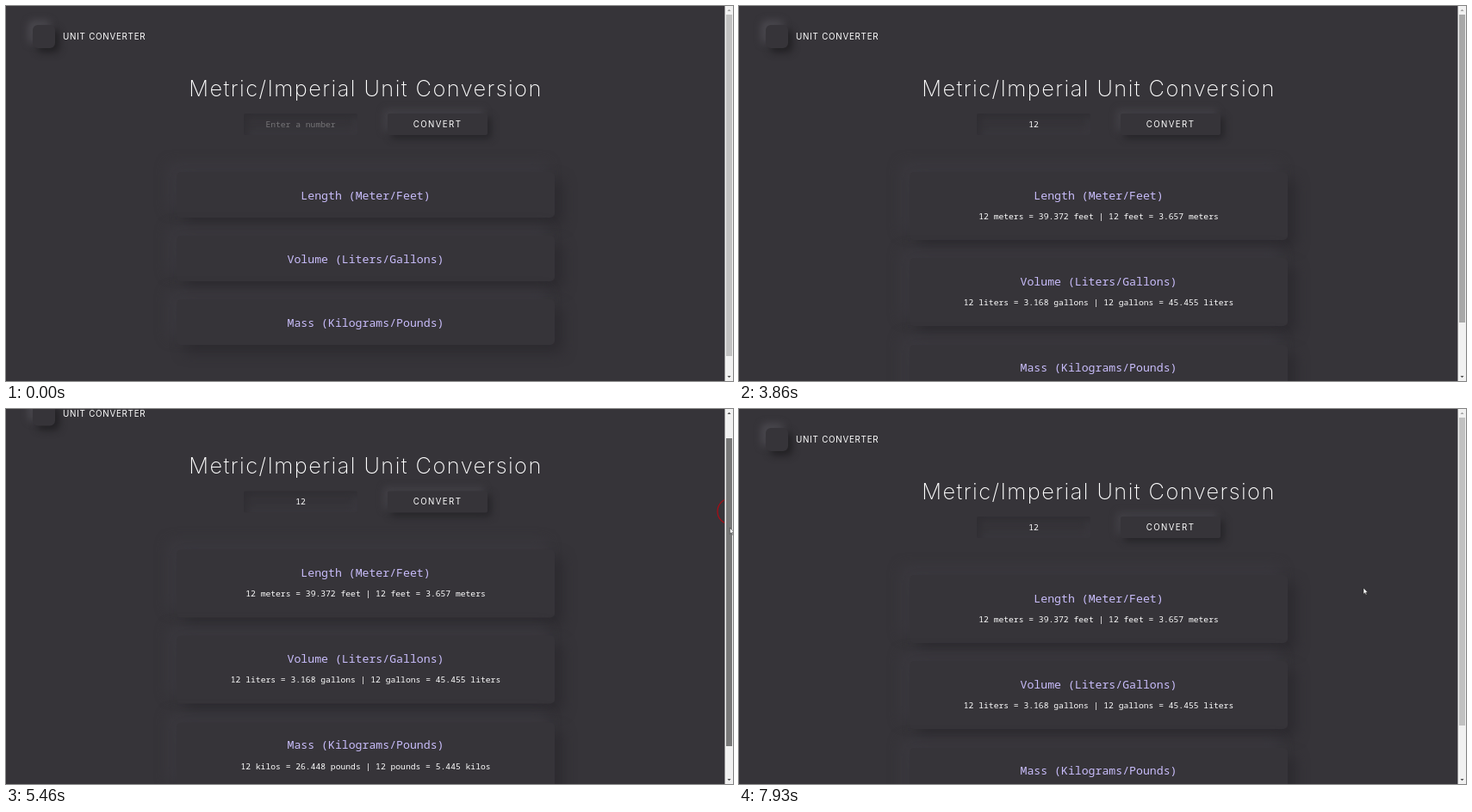
An HTML page that plays this animation: 844 by 436 pixels, repeating every 8 s.

```html
<!DOCTYPE html>
<html lang="en">
<head>
<meta charset="utf-8">
<title>Unit Converter</title>
<style>
html, body { margin: 0; width: 100%; height: 100%; overflow: hidden; background: #363439; }
body { position: relative; font-family: Inter, sans-serif; color: #fff; }
body *, .card { position: absolute; box-sizing: border-box; white-space: pre; }
#page { left: 0; top: 0; width: 835px; height: 508px; }
.logo { left: 30.5px; top: 22px; width: 26.5px; height: 26.5px; border-radius: 6px; background: #363439;
  box-shadow: 5px 5px 9px #222124, -5px -5px 9px #4c4a50; }
.brand { left: 66px; top: 25.5px; line-height: 20px; font-size: 9.8px; letter-spacing: .75px; }
h1 { margin: 0; left: 0; width: 100%; top: 75.5px; line-height: 40px; text-align: center;
  font-size: 25.4px; font-weight: 200; letter-spacing: 1.43px; }
#input, .card { font-family: "Noto Sans Mono", "DejaVu Sans Mono", monospace; text-align: center; }
#input { left: 276px; top: 125px; width: 132px; height: 25px; line-height: 25px; font-size: 9.68px; font-weight: 500;
  border-radius: 2px; box-shadow: inset 4px 4px 9px #302e33, inset -4px -4px 9px #3b393f; }
#input.hint { color: #757477; font-weight: 400; }
#input.focus { outline: 1px solid #e4e4e4; border-radius: 3px; }
#caret { top: 132px; width: 1px; height: 12px; background: #ccc; }
.button { left: 443px; top: 125px; width: 116px; height: 25px; line-height: 25px; border-radius: 2px; text-align: center;
  background: #363439; font-size: 9.7px; letter-spacing: 1.4px;
  box-shadow: 4px 4px 8px #262529, -4px -4px 8px #454349; }
.card { left: 198px; width: 439px; border-radius: 5px; background: #363439;
  box-shadow: 9px 9px 15px #2d2b30, -9px -9px 15px #3b393f; }
.card * { left: 0; width: 100%; line-height: 20px; }
.card b { top: 16.5px; font-size: 13.2px; font-weight: 500; color: #c9bdfb; }
.card i { top: 42px; font-size: 9.68px; font-weight: 500; font-style: normal; }
#bar { left: 834px; top: 0; width: 10px; height: 436px; background: #f1f1f1; border-left: 1px solid #949396; }
#thumb { left: 1px; width: 7px; }
svg { left: 0; top: 0; }
#ring { fill: none; stroke: #b00a14; stroke-width: 1.2; }
#arrow, #hand { fill: #fff; stroke: #111; stroke-width: .5; }
</style>
</head>
<body>
<div id="page">
  <div class="logo"></div>
  <div class="brand">UNIT CONVERTER</div>
  <h1>Metric/Imperial Unit Conversion</h1>
  <div id="input"></div>
  <div id="caret"></div>
  <div class="button">CONVERT</div>
</div>
<svg width="844" height="436"><circle id="ring" r="15"/></svg>
<div id="bar">
  <div id="thumb"></div>
  <svg width="9" height="436"><path id="up" d="M2.5 6L4.5 3.8L6.5 6Z"/><path id="down" d="M2.5 430L4.5 432.2L6.5 430Z"/></svg>
</div>
<svg width="844" height="436">
  <path id="arrow" d="M0 0V7.2L1.7 5.7L2.8 8.2L3.9 7.7L2.8 5.3H5Z"/>
  <path id="hand" d="M-1 .6Q0-.6 1 .6V4L4.2 4.8Q5 5 4.9 6L4.4 9L3.6 10.6H-.6L-3 6.8Q-3.2 5.4-2 5.8L-1 6.8Z"/>
</svg>
<script>
const $ = id => document.getElementById(id);
const show = (el, on) => el.style.visibility = on ? 'visible' : 'hidden';
const MAX_SCROLL = 71.5;

const cards = [
  ['Length (Meter/Feet)', '12 meters = 39.372 feet | 12 feet = 3.657 meters'],
  ['Volume (Liters/Gallons)', '12 liters = 3.168 gallons | 12 gallons = 45.455 liters'],
  ['Mass (Kilograms/Pounds)', '12 kilos = 26.448 pounds | 12 pounds = 5.445 kilos']
].map(([title, result]) => {
  const card = document.createElement('div');
  card.className = 'card';
  card.innerHTML = `<b>${title}</b><i>${result}</i>`;
  $('page').append(card);
  return card;
});

// Keys are [time, value, ...]; values glide between neighbours.
function track(keys, t) {
  const n = keys.findIndex(k => k[0] > t);
  if (n === 0) return keys[0].slice(1);
  if (n < 0) return keys[keys.length - 1].slice(1);
  const a = keys[n - 1], b = keys[n], p = (t - a[0]) / (b[0] - a[0]);
  return a.slice(1).map((v, i) => v + (b[i + 1] - v) * p);
}

const scrollKeys = [[4130, 0], [4200, 6], [4330, 38], [4460, 66], [4530, MAX_SCROLL],
  [5270, MAX_SCROLL], [5330, 62], [5460, 29.6], [5600, 7], [5730, 0]];
const mouseKeys = [[2000, 342, 138], [2130, 385, 139], [2330, 490, 141], [2460, 512, 140], [3470, 512, 140],
  [3600, 600, 133], [3730, 755, 121], [3860, 841, 114], [6470, 840, 113], [6670, 836, 122],
  [6930, 780, 165], [7200, 734, 200], [7400, 724, 209], [7930, 725, 208]];

function draw(t) {
  const done = t >= 3060;
  const dragging = t >= 4130 && t < 5730;
  const [scroll] = track(scrollKeys, t);
  let [x, y] = track(mouseKeys, t);
  if (dragging) y = 114 + scroll / MAX_SCROLL * 58;

  $('page').style.transform = `translateY(${-scroll}px)`;
  cards.forEach((card, i) => {
    card.style.top = 193 + i * (done ? 100.3 : 74) + 'px';
    card.style.height = (done ? 79 : 53) + 'px';
    show(card.lastChild, done);
  });

  const text = t < 1060 ? '' : t < 1260 ? '1' : '12';
  const focus = t >= 300 && t < 2930;
  const typedAt = t < 1060 ? 300 : t < 1260 ? 1060 : 1330;
  $('input').textContent = text || 'Enter a number';
  $('input').className = (text ? '' : 'hint ') + (focus ? 'focus' : '');
  $('caret').style.left = 342 + text.length * 2.95 + 'px';
  show($('caret'), focus && (t - typedAt + 1000) % 1000 < 500);

  const thumb = $('thumb').style;
  thumb.top = 10 + scroll / MAX_SCROLL * 58 + 'px';
  thumb.height = (done ? 358 : 396.5) + 'px';
  thumb.background = dragging ? '#787878' : x > 835 ? '#a8a8a8' : '#c1c1c1';
  $('up').style.fill = scroll > 0 ? '#505050' : '#a3a3a3';
  $('down').style.fill = scroll < MAX_SCROLL ? '#505050' : '#a3a3a3';

  const clicking = t >= 2930 && t < 3130;
  $('ring').setAttribute('transform', clicking ? 'translate(512 141)' : 'translate(841 119)');
  show($('ring'), dragging || clicking);

  const inside = t >= 2060 && x > 409 && !(t >= 3840 && t < 5330);
  const overButton = x > 443 && x < 559;
  for (const id of ['arrow', 'hand']) {
    $(id).setAttribute('transform', `translate(${x} ${y})`);
    show($(id), inside && overButton === (id === 'hand'));
  }
}

let start;
function tick(now) {
  start ??= now;
  draw((now - start) % 8000);
  requestAnimationFrame(tick);
}
draw(0);
requestAnimationFrame(tick);
</script>
</body>
</html>
```
